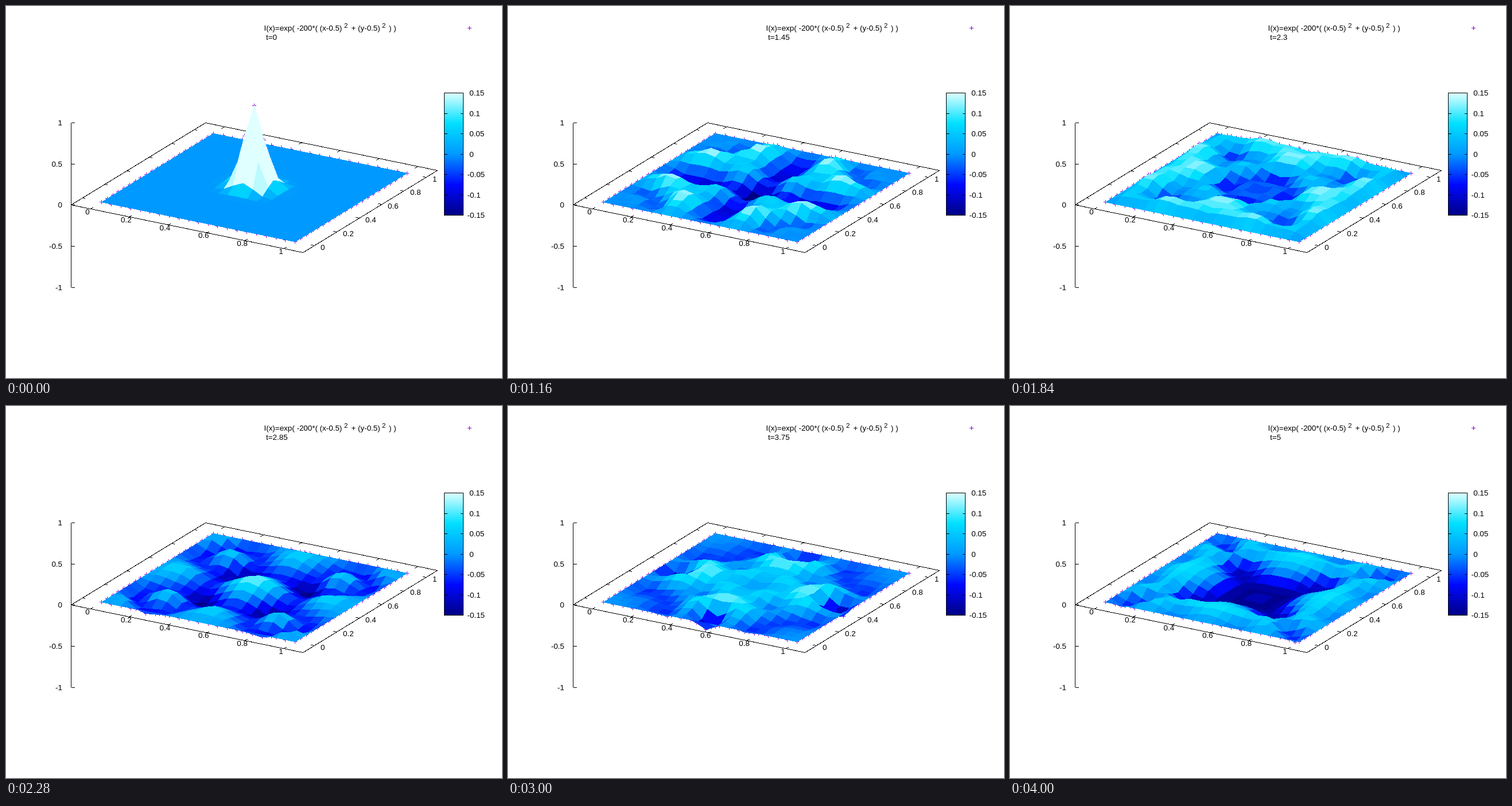
An HTML page that plays this animation: 864 px wide and 648 px high, repeating every 4.04 s.

```html
<!DOCTYPE html>
<html lang="en">
<head>
<meta charset="utf-8">
<title>Wave equation on the unit square</title>
<style>
  html, body { margin: 0; width: 100%; height: 100%; overflow: hidden; background: #fff; }
  svg { display: block; width: 864px; height: 648px; shape-rendering: crispEdges; }
  text { font: 13.4px "Liberation Sans", Arial, sans-serif; fill: #000; white-space: pre; }
  polygon { stroke-width: 1; stroke-linejoin: round; }
  .sup { font-size: 11.5px; }
  .mid { text-anchor: middle; }
  .end { text-anchor: end; }
  .axis { fill: none; stroke: #000; }
  .mark { fill: none; stroke: #9400d3; }
</style>
</head>
<body>
<svg id="stage" viewBox="0 0 864 648">
  <defs><linearGradient id="ramp" x1="0" y1="1" x2="0" y2="0"></linearGradient></defs>
</svg>
<script>
const N = 20, STEPS = 100, FRAME_MS = 40, DT = 0.05;
const COURANT2 = 0.5;
const LIMIT = 0.15;
const STOPS = [[0, 0, 132], [0, 8, 255], [0, 153, 255], [0, 224, 255], [224, 255, 255]];

const stage = document.getElementById('stage');

function add(tag, attrs, text) {
  const el = document.createElementNS('http://www.w3.org/2000/svg', tag);
  for (const key in attrs) el.setAttribute(key, attrs[key]);
  if (text !== undefined) el.textContent = text;
  (tag === 'stop' ? document.getElementById('ramp') : stage).appendChild(el);
  return el;
}
const label = (x, y, text, cls = '') => add('text', { x, y, class: cls }, text);
const line = (x, y, dx, dy) => `M${x + 0.5} ${y + 0.5}l${dx} ${dy}`;
const plus = (x, y) => {
  x = Math.floor(x);
  y = Math.floor(y);
  return `M${x - 3} ${y + 0.5}h7M${x + 0.5} ${y - 3}v7`;
};

function colour(z) {
  const s = Math.min(Math.max((z / LIMIT + 1) * 2, 0), 4);
  const k = Math.min(Math.floor(s), 3);
  const rgb = STOPS[k].map((a, c) => Math.round(a + (STOPS[k + 1][c] - a) * (s - k)));
  return `rgb(${rgb})`;
}

// Parallel view, tilted by 60 and turned by 30 degrees; both axes span -0.1 to 1.1.
const SIN60 = Math.sqrt(3) / 2;
function project(x, y, z) {
  const a = (x - 0.5) / 1.2, b = (y - 0.5) / 1.2;
  return [
    432.5 + 467 * (SIN60 * a + b / 2),
    316.5 + 331 * (a / 4 - SIN60 / 2 * (b + z))
  ];
}

// Leapfrog solution of the wave equation with fixed edges.
const at = (i, j) => j * (N + 1) + i;
function simulate() {
  const size = (N + 1) ** 2;
  const first = new Float64Array(size);
  for (let j = 1; j < N; j++)
    for (let i = 1; i < N; i++)
      first[at(i, j)] = Math.exp(-200 * ((i / N - 0.5) ** 2 + (j / N - 0.5) ** 2));
  const states = [first];
  for (let n = 0; n < STEPS; n++) {
    const u = states[n], prev = states[n - 1], next = new Float64Array(size);
    for (let j = 1; j < N; j++)
      for (let i = 1; i < N; i++) {
        const p = at(i, j);
        const force = COURANT2 * (u[p - 1] + u[p + 1] + u[p - N - 1] + u[p + N + 1] - 4 * u[p]);
        next[p] = prev ? 2 * u[p] - prev[p] + force : u[p] + force / 2;
      }
    states.push(next);
  }
  return states;
}

function drawAxes() {
  let d = 'M113.5 346.5L517.5 429.5L751.5 286.5L347.5 203.5ZM113.5 203.5V489.5';
  for (let k = 0; k <= 5; k++) {
    const v = k / 5, text = String(v);
    const edge = (x, y, dx, dy) => { d += line(...project(x, y, 0).map(Math.floor), dx, dy); };
    edge(v, -0.1, 5, -3);
    edge(v, 1.1, -5, 3);
    edge(-0.1, v, 6, 1);
    edge(1.1, v, -6, -1);
    label(142 + 67.4 * k, 363 + 13.8 * k, text, 'mid');
    label(548 + 39 * k, 425 - 23.9 * k, text);
  }
  for (let k = -2; k <= 2; k++) {
    const y = Math.round(346.2 - 71.7 * k);
    d += line(113, y, 6, 0);
    label(98, y + 4.5, k / 2, 'end');
  }
  add('path', { d, class: 'axis' });
}

function drawColourBar() {
  STOPS.forEach((rgb, k) => add('stop', { offset: k / 4, 'stop-color': `rgb(${rgb})` }));
  add('rect', { x: 763, y: 151, width: 33, height: 214, fill: 'url(#ramp)' });
  let d = 'M763.5 151.5H796.5V364.5H763.5Z';
  for (let k = -3; k <= 3; k++) {
    const y = Math.round(257.75 - 35.5 * k);
    d += line(763, y, 5, 0) + line(796, y, -5, 0);
    label(k < 0 ? 803.5 : 807.2, y + 4.5, k * 5 / 100);
  }
  add('path', { d, class: 'axis' });
}

function drawTitle() {
  label(449.5, 42.5, 'I(x)=exp( -200*( (x-0.5)');
  label(589, 38, '2', 'sup');
  label(601.5, 42.5, '+ (y-0.5)');
  label(655, 38, '2', 'sup');
  label(667, 42.5, ') )');
  add('path', { d: plus(807, 38), class: 'mark' });
}

drawAxes();
drawColourBar();
drawTitle();
const clock = label(453, 58.5, '');
const marks = add('path', { class: 'mark' });
const cells = Array.from({ length: N * N }, () => add('polygon', {}));
const states = simulate();

function draw(n) {
  const u = states[n];
  const points = Array.from(u, (z, p) => project(p % (N + 1) / N, Math.floor(p / (N + 1)) / N, z));
  clock.textContent = 't=' + +(n * DT).toFixed(2);
  marks.setAttribute('d', points.map(p => plus(...p)).join(''));
  let c = 0;
  // Far cells first, so that near ones cover them.
  for (let j = N - 1; j >= 0; j--)
    for (let i = 0; i < N; i++) {
      const corners = [at(i, j), at(i + 1, j), at(i + 1, j + 1), at(i, j + 1)];
      const mean = corners.reduce((sum, p) => sum + u[p], 0) / 4;
      const cell = cells[c++], paint = colour(mean);
      cell.setAttribute('points', corners.map(p => points[p].map(v => v.toFixed(2))).join(' '));
      cell.setAttribute('fill', paint);
      cell.setAttribute('stroke', paint);
    }
}

let shown = -1;
function tick() {
  const n = Math.floor(performance.now() / FRAME_MS) % (STEPS + 1);
  if (n !== shown) draw(shown = n);
  requestAnimationFrame(tick);
}
tick();
</script>
</body>
</html>
```
